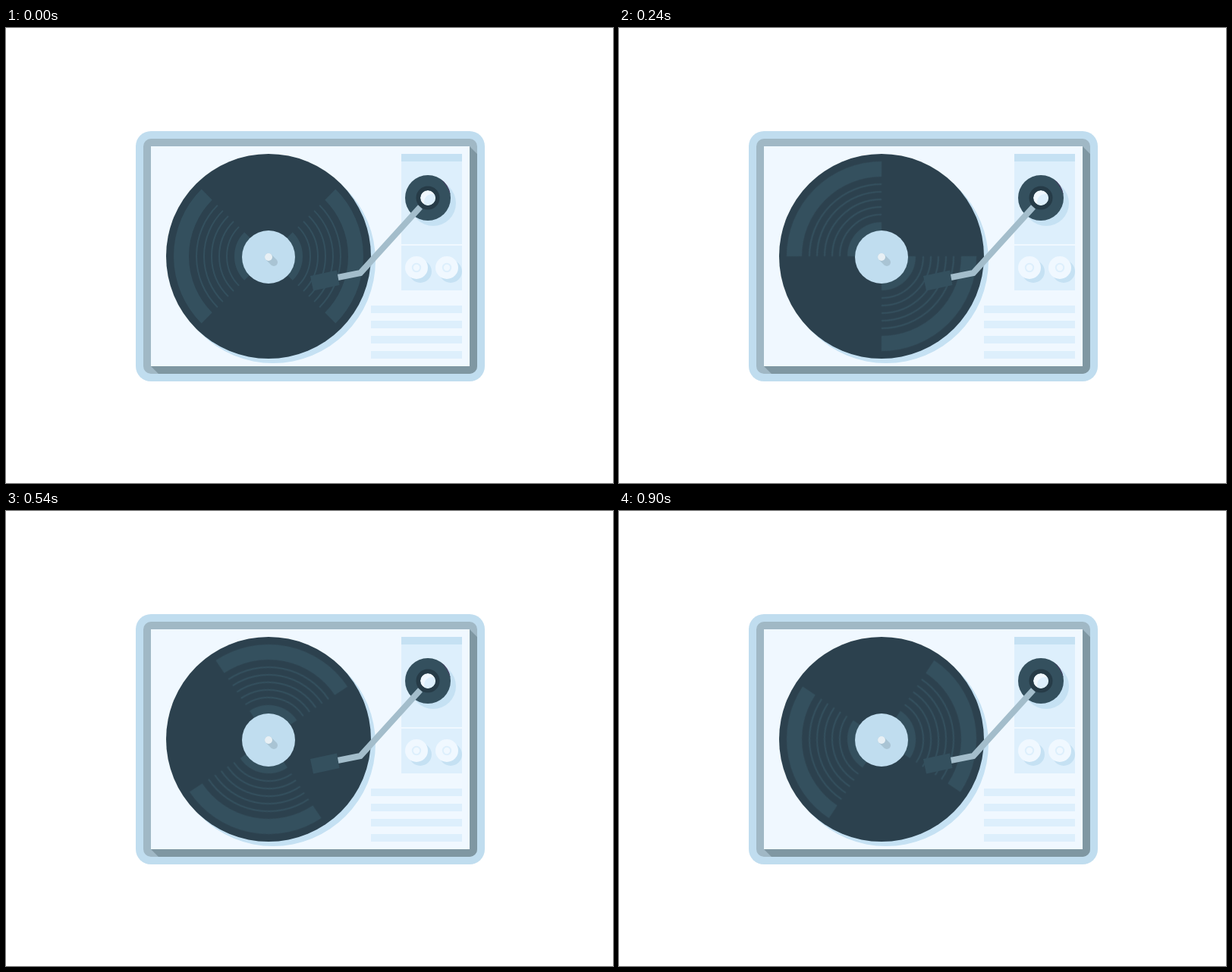
Animation of 800x600 px, one loop 960 ms. Source, as an HTML page:

```html
<!DOCTYPE html>
<html lang="en">
<head>
<meta charset="utf-8">
<title>Turntable</title>
<style>
  html, body { margin: 0; width: 100%; height: 100%; overflow: hidden; background: #fff; }
  svg { display: block; width: 800px; height: 600px; }
  :root {
    --edge: #c0ddef; --shade: #c5e1f3; --pale: #ddeffc; --deck: #f0f8ff;
    --vinyl: #2c414e; --shine: #34505e; --metal: #a3bdcb;
  }
  #shine { fill: none; stroke: var(--shine); transform-origin: 346px 301px; animation: spin 960ms steps(16) infinite; }
  @keyframes spin { to { transform: rotate(180deg); } }
</style>
</head>
<body>
<svg viewBox="0 0 800 600">
  <!-- case -->
  <rect x="171" y="136" width="460" height="330" rx="20" fill="var(--edge)"/>
  <rect x="181" y="146" width="440" height="310" rx="10" fill="#a0b8c5"/>
  <path d="M611 156L621 166V446A10 10 0 0 1 611 456H201L191 446H611Z" fill="#7f97a2"/>
  <rect x="191" y="156" width="420" height="290" fill="var(--deck)"/>

  <!-- control panels and vents -->
  <g fill="var(--pale)">
    <path d="M521 176h80v109h-80zM521 287h80v59h-80z"/>
    <path d="M481 366h120v10h-120zM481 386h120v10h-120zM481 406h120v10h-120zM481 426h120v10h-120z"/>
  </g>
  <rect x="521" y="166" width="80" height="10" fill="var(--shade)"/>
  <g id="knob">
    <circle cx="546" cy="321" r="15" fill="var(--shade)"/>
    <circle cx="541" cy="316" r="15" fill="var(--deck)"/>
    <circle cx="541" cy="316" r="5.2" fill="none" stroke="var(--pale)" stroke-width="2"/>
  </g>
  <use href="#knob" x="40"/>

  <!-- record -->
  <circle cx="352" cy="307" r="135" fill="var(--shade)"/>
  <circle cx="346" cy="301" r="135" fill="var(--vinyl)"/>
  <g id="shine"></g>
  <circle cx="346" cy="302" r="35" fill="var(--edge)"/>
  <path d="M346 302L353 309" stroke="#a9c4d4" stroke-width="10" stroke-linecap="round"/>
  <circle cx="346" cy="302" r="5" fill="#e8f0f5"/>

  <!-- pivot and tonearm -->
  <circle cx="563" cy="231" r="30" fill="var(--shade)"/>
  <circle cx="556" cy="224" r="30" fill="var(--shine)"/>
  <path d="M573 199.300A30 30 0 0 1 585.700 220Q582 208 573 199.300Z" fill="#4b3f66"/>
  <circle cx="556" cy="224" r="15.500" fill="#263b47"/>
  <clipPath id="hole"><circle cx="556" cy="224" r="10"/></clipPath>
  <g clip-path="url(#hole)">
    <circle cx="556" cy="224" r="10" fill="var(--deck)"/>
    <circle cx="561" cy="229" r="10" fill="var(--pale)"/>
  </g>
  <path d="M546 236L467 323L437 329" fill="none" stroke="var(--metal)" stroke-width="8"/>
  <path d="M401 327L436 319.500L439.500 339L405 346.500Z" fill="var(--shine)"/>
</svg>
<script>
  const shine = document.getElementById('shine');
  const cx = 346, cy = 301;

  // a pair of opposite quarter arcs
  function arcs(r, width) {
    const d = r * Math.SQRT1_2;
    const path = document.createElementNS('http://www.w3.org/2000/svg', 'path');
    path.setAttribute('d',
      `M${cx - d} ${cy + d}A${r} ${r} 0 0 1 ${cx - d} ${cy - d}` +
      `M${cx + d} ${cy - d}A${r} ${r} 0 0 1 ${cx + d} ${cy + d}`);
    path.setAttribute('stroke-width', width);
    shine.append(path);
  }

  arcs(115, 20);
  for (let r = 95; r >= 55; r -= 10) arcs(r, 2);
  arcs(38, 14);
</script>
</body>
</html>
```
